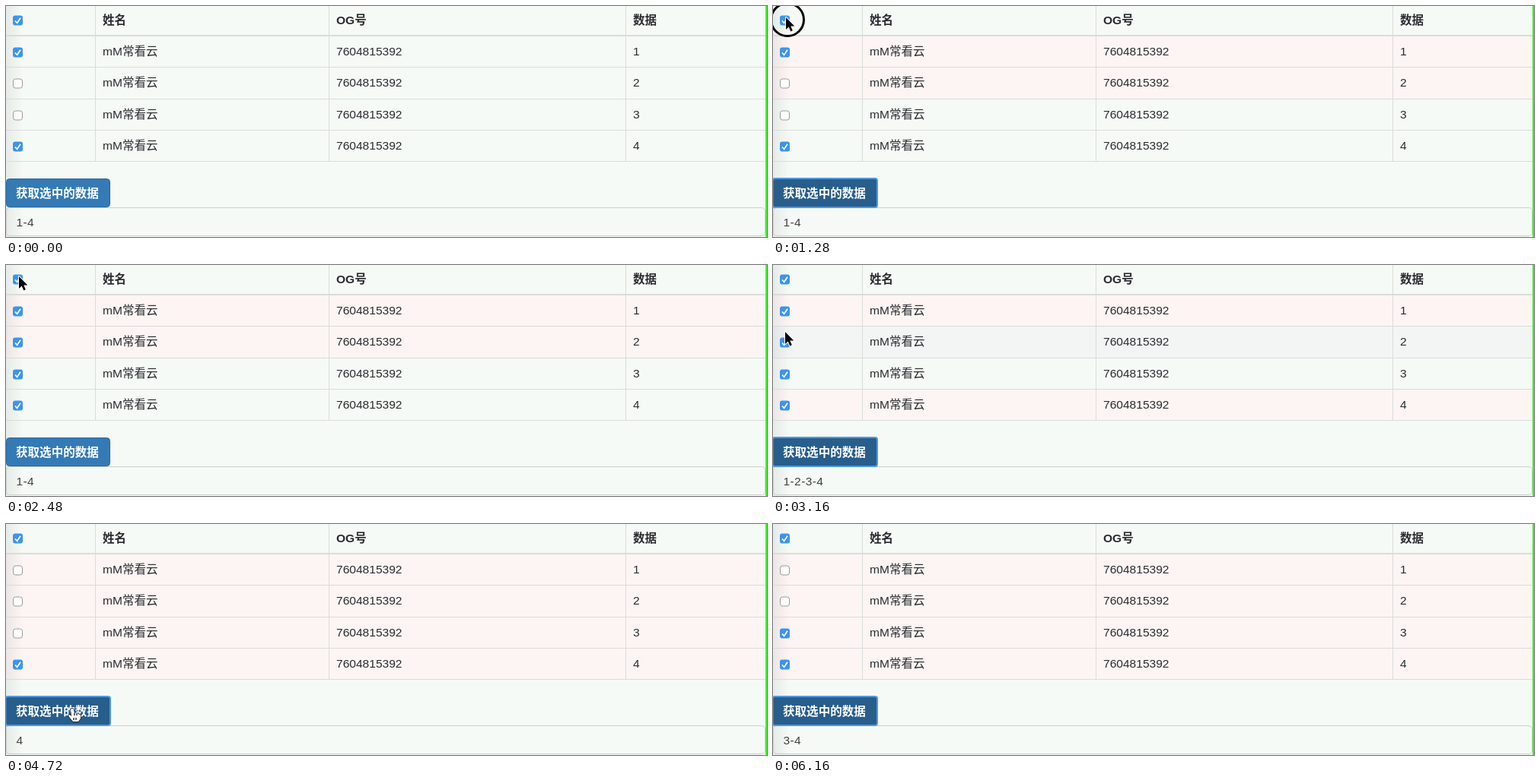
Write an HTML page with a canvas that moves like this. It is 1000x304 px and loops after 6200 ms.

```html
<!DOCTYPE html>
<html lang="zh">
<head>
<meta charset="utf-8">
<style>
  html, body { margin: 0; width: 100%; height: 100%; overflow: hidden; background: #f6faf6; }
  canvas { display: block; }
</style>
</head>
<body>
<canvas id="stage" width="1000" height="304"></canvas>
<script>
const ctx = document.getElementById('stage').getContext('2d');
const LOOP = 6200, STEP = 40;
const FONT = '15.55px "Liberation Sans", "Noto Sans CJK SC", "Noto Sans CJK", sans-serif';
const COLUMNS = [127, 434, 824];
const LINES = [39, 80, 122, 163, 204];

const easeIn = k => k * k;
const easeOut = k => k * (2 - k);
const smooth = k => k * k * (3 - 2 * k);

// Pointer path: time, x, y, easing towards this point
const PATH = [
  [440, 1010, 312], [700, 598, 150, easeIn], [1060, 17, 15, easeOut],
  [2500, 17, 15], [2800, 88, 243], [2960, 88, 243],
  [3160, 16, 88], [3320, 18, 59], [3520, 18, 59], [3640, 18, 101],
  [3820, 18, 101], [3960, 20, 142], [4220, 20, 142], [4480, 87, 243],
  [4820, 87, 243], [5120, 19, 142], [5340, 19, 142], [5600, 87, 243],
  [5800, 87, 243], [6080, 340, 312, easeIn]
];
// Mouse-down times; each press shows a ring, then takes effect
const PRESSES = [1240, 2000, 2840, 3400, 3700, 4080, 4560, 5200, 5640];
const PRESS_LENGTH = 120;
// Checked boxes (header first) from a given time
const CHECKS = [
  [0, '11001'], [1360, '00000'], [2120, '11111'], [3520, '10111'],
  [3820, '10011'], [4200, '10001'], [5320, '10011']
];
const RESULTS = [[0, '1-4'], [2960, '1-2-3-4'], [4680, '4'], [5760, '3-4']];
const FOCUS = [[0, false], [1240, true], [1360, false], [2840, true], [3400, false], [4560, true], [5200, false], [5640, true]];
const WARM_FROM = [1000, 960, 4220, 2600];

const at = (list, t) => list.filter(item => item[0] <= t).pop()[1];

function pointer(t) {
  const i = PATH.findIndex(p => p[0] > t);
  if (i < 1) return null;
  const [t0, x0, y0] = PATH[i - 1], [t1, x1, y1, ease = smooth] = PATH[i];
  const k = ease((t - t0) / (t1 - t0));
  return [x0 + (x1 - x0) * k, y0 + (y1 - y0) * k];
}

function rect(x, y, w, h, color) {
  ctx.fillStyle = color;
  ctx.fillRect(x, y, w, h);
}

function box(x, y, w, h, r, fill, stroke, width = 1) {
  ctx.beginPath();
  ctx.roundRect(x, y, w, h, r);
  if (fill) { ctx.fillStyle = fill; ctx.fill(); }
  if (stroke) { ctx.strokeStyle = stroke; ctx.lineWidth = width; ctx.stroke(); }
}

function text(value, x, y, color = '#2a2c30', bold = false) {
  ctx.font = (bold ? 'bold ' : '') + FONT;
  ctx.fillStyle = color;
  ctx.fillText(value, x, y);
}

function checkbox(y, checked) {
  if (!checked) return box(9.5, y - 6, 12, 12, 3, '#fdfdfd', '#9c9c9c');
  box(9, y - 6.5, 13, 13, 3, '#3b94f0');
  ctx.strokeStyle = '#fff';
  ctx.lineWidth = 1.8;
  ctx.stroke(new Path2D(`M12 ${y + .5}l2.6 2.9 4.4-6.6`));
}

function table(t, mouse) {
  const checks = at(CHECKS, t);
  for (let i = 0; i < 4; i++) {
    const top = LINES[i], bottom = LINES[i + 1];
    const hover = mouse && mouse[1] >= top && mouse[1] < bottom;
    if (hover || t >= WARM_FROM[i]) rect(0, top, 998, bottom - top, hover ? '#f3f4f4' : '#fcf5f3');
  }
  const shade = ctx.createLinearGradient(0, 0, 22, 0);
  shade.addColorStop(0, 'rgba(90,100,110,.1)');
  shade.addColorStop(1, 'rgba(90,100,110,0)');
  rect(0, 0, 22, 304, shade);

  LINES.forEach((y, i) => rect(0, i ? y : y - 1, 998, i ? 1 : 2, '#dadcda'));
  [117, 424, 814].forEach(x => rect(x, 0, 1, 204, '#dadcda'));

  ['姓名', 'OG号', '数据'].forEach((label, i) => text(label, COLUMNS[i], 24, '#2a2c30', true));
  checkbox(19, checks[0] === '1');
  for (let i = 0; i < 4; i++) {
    const y = Math.round(65 + i * 41.3);
    ['mM常看云', '7604815392', i + 1].forEach((value, c) => text(value, COLUMNS[c], y));
    checkbox(y - 4, checks[i + 1] === '1');
  }
}

function button(focused) {
  if (focused) box(-.5, 227, 137.5, 38, 3, '#285e8c', '#5098e0', 2);
  else box(.5, 227.5, 136, 37, 4, '#347ab5', '#2b679c');
  text('获取选中的数据', 13, 252, '#fff', true);
}

function cursor([x, y], t) {
  if (PRESSES.some(p => t >= p && t < p + PRESS_LENGTH)) {
    ctx.beginPath();
    ctx.arc(x + 2, y + 3, 21.5, 0, Math.PI * 2);
    ctx.strokeStyle = '#000';
    ctx.lineWidth = 3;
    ctx.stroke();
  }
  const hand = x < 137 && y > 227 && y < 265;
  const shape = new Path2D(hand
    ? 'M-2 1Q0-2 2 1L3 6Q5 4 6 7Q8 5 9 8Q11 7 11 10V13L8 17H1L-4 11Q-6 8-3 8L-1 10Z'
    : 'M0 0V16L3.7 12.6 6.3 18.4 8.8 17.2 6.3 11.6H11.3Z');
  ctx.save();
  ctx.translate(x, y);
  ctx.lineJoin = 'round';
  ctx.lineWidth = hand ? 1.3 : 2;
  ctx.strokeStyle = hand ? '#111' : '#fff';
  ctx.fillStyle = hand ? '#fff' : '#000';
  ctx.stroke(shape);
  ctx.fill(shape);
  if (hand) ctx.stroke(new Path2D('M3 6V9M6 7V9M2 12V15M5 12V15'));
  ctx.restore();
}

function draw(now) {
  const t = Math.floor(now % LOOP / STEP) * STEP;
  const mouse = pointer(t);
  rect(0, 0, 1000, 304, '#f6faf6');
  table(t, mouse);
  box(.5, 265.5, 997, 37, 4, null, '#cccfcc');
  ctx.letterSpacing = '.4px';
  text(at(RESULTS, t), 13.5, 290, '#3e4042');
  ctx.letterSpacing = '0px';
  button(at(FOCUS, t));
  rect(998, 0, 2, 304, '#35f51c');
  if (mouse) cursor(mouse, t);
  requestAnimationFrame(draw);
}
requestAnimationFrame(draw);
</script>
</body>
</html>
```
